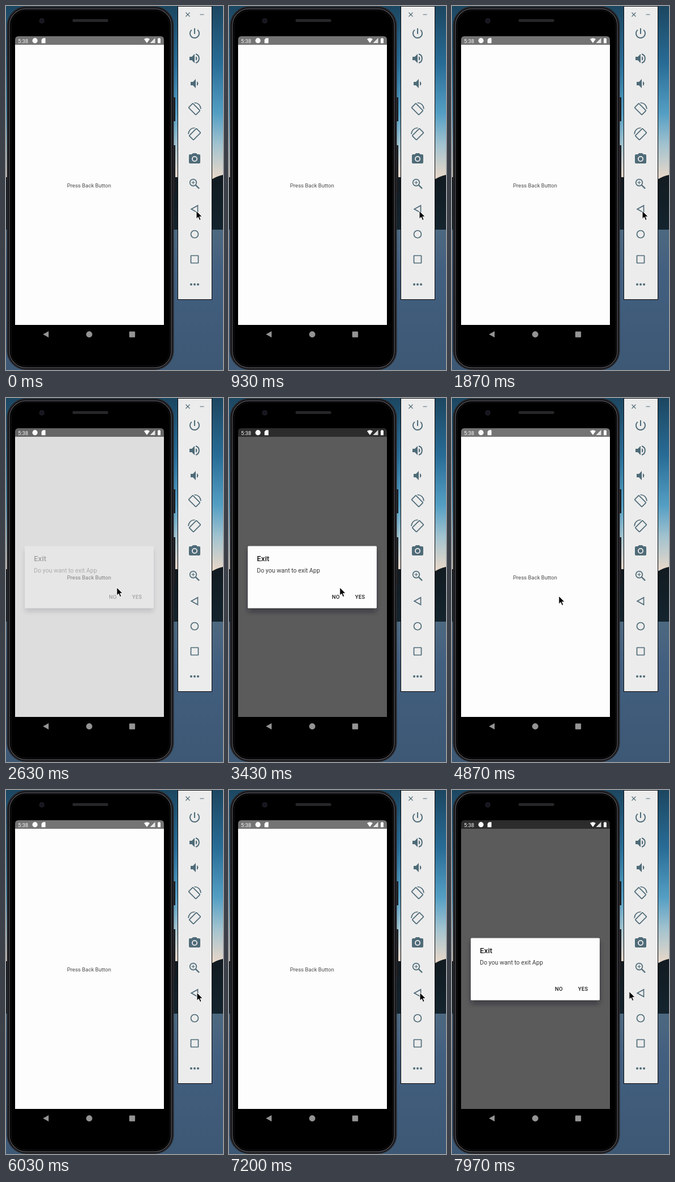
Animation of 382 by 638 pixels, one loop 8 s. Source, as an HTML page:

```html
<!DOCTYPE html>
<html lang="en">
<head>
<meta charset="utf-8">
<title>Exit dialog demo</title>
<style>
  html, body { margin: 0; width: 100%; height: 100%; overflow: hidden; background: #000; }
  svg { display: block; width: 100vw; height: 100vh; }
  text { font-family: Roboto, sans-serif; font-size: 9.4px; }
  .medium { font-weight: 500; }
  #toolbar { fill: #4f6b78; }
  .line { fill: none; stroke: #4f6b78; stroke-width: 1.7; }
</style>
</head>
<body>
<svg viewBox="0 0 382 638">
  <defs>
    <linearGradient id="sky" x2="0" y2="1">
      <stop offset="0" stop-color="#1c4660"/>
      <stop offset=".33" stop-color="#286c96"/>
      <stop offset=".62" stop-color="#559fc4"/>
      <stop offset=".8" stop-color="#a3c3cf"/>
      <stop offset="1" stop-color="#ecd8c8"/>
    </linearGradient>
    <linearGradient id="water" x2="0" y2="1">
      <stop offset="0" stop-color="#4d6980"/>
      <stop offset=".3" stop-color="#435f80"/>
      <stop offset="1" stop-color="#3c5874"/>
    </linearGradient>
    <linearGradient id="hill" x2="0" y2="1">
      <stop offset="0" stop-color="#111a20"/>
      <stop offset="1" stop-color="#14242e"/>
    </linearGradient>
    <filter id="blur" x="-20%" y="-20%" width="140%" height="150%">
      <feGaussianBlur stdDeviation="4"/>
    </filter>
  </defs>

  <g id="wallpaper">
    <rect width="382" height="305" fill="url(#sky)"/>
    <path d="M0 300H300L362 304Q372 298 382 296V393H0Z" fill="url(#hill)"/>
    <rect y="392" width="382" height="246" fill="url(#water)"/>
  </g>

  <g id="phone">
    <path d="M294 160h4v42h-4zM294 244h4v84h-4z" fill="#1c1d20"/>
    <rect x="2.5" y="1.5" width="292" height="635.5" rx="33" fill="#111114" stroke="#28282c" stroke-width="2"/>
    <rect x="6" y="5" width="285" height="629" rx="29" fill="#000" stroke="#505056" stroke-width="1.4"/>
    <rect x="9" y="8" width="279" height="623" rx="26" fill="#000" stroke="#161618"/>
    <circle cx="63" cy="26" r="4" fill="#15151f" stroke="#26262e"/>
    <rect x="117" y="23" width="63" height="5" rx="2.5" fill="#26262a"/>
    <path id="screen" d="M16 68H278V559H16Z" fill="#fdfdfd"/>
    <path id="status" d="M16 68V59Q16 53 22 53H272Q278 53 278 59V68Z" fill="#747474"/>
    <g fill="#fafafa">
      <text x="21" y="64.5">5:38</text>
      <circle cx="51" cy="60.7" r="4.6"/>
      <path d="M62.5 59L65 56.3H69.5V65.3H62.5Z"/>
      <path d="M243 58Q248 54.3 253 58L248 65Z"/>
      <path d="M262.5 56V65H253.5Z" fill-opacity=".85"/>
      <path d="M267 57H268.5V56H270.5V57H272V65.3H267Z"/>
    </g>
    <g fill="#949494">
      <path d="M65 575.5L75 570V581Z"/>
      <circle cx="146.5" cy="575.5" r="5.4"/>
      <rect x="217" y="570.5" width="10.2" height="10.2" rx="1"/>
    </g>
    <text x="107.5" y="317.8" fill="#4c4c4c" style="font-size:9.5px">Press Back Button</text>
    <g id="dialog" opacity="0">
      <rect x="34" y="266" width="225" height="108" fill="#101020" fill-opacity=".5" filter="url(#blur)"/>
      <rect x="33" y="259.5" width="227" height="109" rx="1.5" fill="#fdfdfd"/>
      <g fill="#1c1c1c">
        <text class="medium" x="49" y="286" style="font-size:13.3px">Exit</text>
        <text x="49" y="306.3" style="font-size:10.6px" fill="#3c3c3c">Do you want to exit App</text>
        <text class="medium" x="181.3" y="351.5" letter-spacing=".3">NO</text>
        <text class="medium" x="222" y="351.5" letter-spacing=".2">YES</text>
      </g>
    </g>
  </g>

  <g id="toolbar">
    <rect x="302.5" y=".5" width="60" height="514" fill="#ececec" stroke="#08080a"/>
    <path class="line" style="stroke-width:1.2" d="M316.5 11.5l7 7m0-7l-7 7M341.5 15h7"/>
  </g>

  <g id="cursor">
    <path d="M0 0V14.2L3.3 11.2L5.6 16.6L8.1 15.5L5.8 10.3H10.3Z" fill="#000" stroke="#fff" stroke-width="1" stroke-linejoin="round"/>
  </g>
</svg>
<script>
  const LOOP = 8000;
  const find = id => document.getElementById(id);

  // Toolbar icons on a 24-unit grid, from top to bottom.
  const rotate = `<g class="line">
    <rect x="2.5" y="7.5" width="18" height="10.5" rx="1" transform="rotate(45 11.5 12.7)"/>
    <path d="M11.5 1.5Q21.8 2 23 12.5"/></g>`;
  const icons = [
    '<path d="M13 3h-2v10h2V3zm4.83 2.17l-1.42 1.42C17.99 7.86 19 9.81 19 12c0 3.87-3.13 7-7 7s-7-3.13-7-7c0-2.19 1.01-4.14 2.58-5.42L6.17 5.17C4.23 6.82 3 9.26 3 12c0 4.97 4.03 9 9 9s9-4.03 9-9c0-2.74-1.23-5.18-3.17-6.83z"/>',
    '<path d="M3 9v6h4l5 5V4L7 9z"/><path d="M14 8a4.5 4.5 0 0 1 0 8z"/><path class="line" style="stroke-width:2" d="M14 4.3a8 8 0 0 1 0 15.4"/>',
    '<path d="M5 9v6h4l5 5V4L9 9z"/><path d="M16 8a4.5 4.5 0 0 1 0 8z"/>',
    rotate,
    `<g transform="matrix(-1 0 0 1 24 0)">${rotate}</g>`,
    '<path fill-rule="evenodd" d="M9 2L7.2 4H4a2 2 0 0 0-2 2v12a2 2 0 0 0 2 2h16a2 2 0 0 0 2-2V6a2 2 0 0 0-2-2h-3.2L15 2zM12 7a5 5 0 0 1 0 10a5 5 0 0 1 0-10z"/><circle cx="12" cy="12" r="3.2"/>',
    '<g class="line"><circle cx="9.5" cy="9.5" r="5.8"/><path d="M14 14l6 6" style="stroke-width:2.4"/><path d="M6.5 9.5h6m-3-3v6" style="stroke-width:1.2"/></g>',
    '<path class="line" d="M6.2 12L17.5 5.8V18.2z"/>',
    '<circle class="line" cx="12" cy="12" r="6.5"/>',
    '<rect class="line" x="5.5" y="5.5" width="13" height="13" rx=".5"/>',
    [6, 12, 18].map(x => `<circle cx="${x}" cy="12" r="2"/>`).join('')
  ];
  find('toolbar').insertAdjacentHTML('beforeend', icons.map((icon, i) =>
    `<g transform="translate(320 ${36 + 44 * i})">${icon}</g>`).join(''));

  // Each step is [time in ms, value, easing towards the next step].
  function play(id, property, steps) {
    const frames = steps.map(([time, value, easing = 'linear']) =>
      ({ offset: time / LOOP, [property]: value, easing }));
    find(id).animate(frames, { duration: LOOP, iterations: Infinity });
  }

  // The dialog opens twice and is dismissed once.
  const fade = (closed, open, easing) => [
    [0, closed], [2590, closed, easing], [2800, open],
    [4200, open, easing], [4410, closed],
    [7590, closed, easing], [7800, open], [LOOP, open]
  ];
  play('screen', 'fill', fade('#fdfdfd', '#5b5b5c', 'linear'));
  play('status', 'fill', fade('#747474', '#2c2c2c', 'linear'));
  play('dialog', 'opacity', fade(0, 1, 'ease-out'));

  const at = (x, y) => `translate(${x}px, ${y}px)`;
  const smooth = 'ease-in-out';
  play('cursor', 'transform', [
    [0, at(335, 359)], [1950, at(335, 359), smooth],
    [2500, at(195, 332)], [3500, at(195, 332), smooth],
    [4000, at(188, 347)], [4950, at(188, 347), smooth],
    [5900, at(336, 355)], [7780, at(336, 355), 'ease-in'],
    [7970, at(312, 353)], [LOOP, at(306, 352)]
  ]);
</script>
</body>
</html>
```
